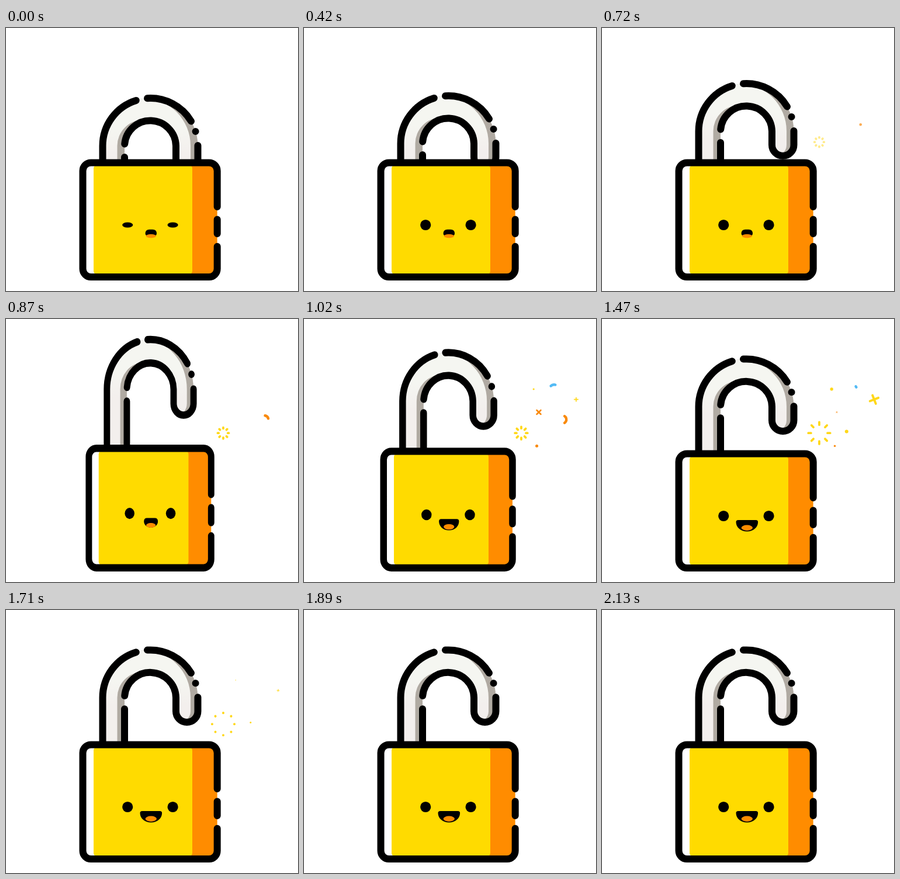
These frames come from a looping animation (500 by 450 pixels, 2160 ms). An HTML page with a canvas:

```html
<!DOCTYPE html>
<html lang="en">
<head>
<meta charset="utf-8">
<title>Opening padlock</title>
<style>
  html, body { margin: 0; width: 100%; height: 100%; overflow: hidden; background: #fff; }
  canvas { display: block; }
</style>
</head>
<body>
<canvas id="stage" width="500" height="450"></canvas>
<script>
const ctx = document.getElementById('stage').getContext('2d');
const LOOP = 2160, STEP = 30;
const YELLOW = '#ffdb00', SPARK = '#ffd81a', ORANGE = '#ff8c00', CORAL = '#f98a0d', BLUE = '#52baf5';

const linear = x => x;
const easeIn = x => x * x;
const easeOut = x => 1 - (1 - x) * (1 - x);
const easeBoth = x => x * x * (3 - 2 * x);
const mix = (a, b, x) => a + (b - a) * x;

// Keys are [time, value, easing towards this key].
function track(keys, t) {
  if (t <= keys[0][0]) return keys[0][1];
  for (let i = 1; i < keys.length; i++) {
    const [t1, v1, ease = linear] = keys[i];
    const [t0, v0] = keys[i - 1];
    if (t <= t1) return mix(v0, v1, ease((t - t0) / (t1 - t0)));
  }
  return keys[keys.length - 1][1];
}

const lift = [[0, 0], [120, -8, easeBoth], [240, 0, easeBoth], [360, -8, easeBoth], [480, 0, easeBoth],
  [600, 0], [720, -25, easeIn], [870, -67.5, easeOut], [1020, -55, easeBoth], [1080, -55.5],
  [1260, -53, easeBoth], [1400, -51.7, easeBoth]];
const stretch = [[720, 0], [870, 2.2, easeBoth], [1020, 1, easeIn], [1080, 0], [1170, -.6, easeOut],
  [1260, -.35, easeBoth], [1380, 0, easeBoth]];
const eyeOpen = [[0, .5], [120, 1, easeOut]];
const smile = [[750, 0], [1020, .9, easeBoth], [1110, 1, easeOut]];

const tube = new Path2D('M165.5 340V201.5A81.5 81.5 0 0 1 328.5 201.5V225A18.75 18.75 0 0 1 291 225V201.5A44 44 0 0 0 203 201.5V340Z');
const tubeLine = new Path2D('M165.5 340V201.5A81.5 81.5 0 0 1 222.8 123.9M242 120.3A81.5 81.5 0 0 1 317 159.5M324.6 177v.01' +
  'M328.5 201V225A18.75 18.75 0 0 1 291 225V201.5A44 44 0 0 0 203.2 198.5M203 221V340');
const boxLine = new Path2D('M361.7 306V244.5A14 14 0 0 0 347.7 230.5H145.5A14 14 0 0 0 131.5 244.5V412A14 14 0 0 0 145.5 426H347.7' +
  'A14 14 0 0 0 361.7 412V373.8M361.7 327.5V352');

function fill(color, path) {
  ctx.fillStyle = color;
  ctx.fill(path);
}

function stroke(color, width, path) {
  ctx.strokeStyle = color;
  ctx.lineWidth = width;
  ctx.stroke(path);
}

function ellipse(color, x, y, rx, ry = rx) {
  const p = new Path2D();
  p.ellipse(x, y, rx, ry, 0, 0, Math.PI * 2);
  fill(color, p);
}

function rect(color, x, y, w, h, r = 0) {
  const p = new Path2D();
  p.roundRect(x, y, w, h, r);
  fill(color, p);
}

function drawShackle(dy) {
  ctx.save();
  ctx.translate(0, dy);
  ctx.save();
  ctx.clip(tube);
  rect('#b0aaa2', 150, 110, 190, 240);
  ctx.translate(-12.5, 0);
  const light = ctx.createLinearGradient(0, 170, 0, 215);
  light.addColorStop(0, '#f5f6f1');
  light.addColorStop(1, '#f3efed');
  fill(light, tube);
  ctx.restore();
  stroke('#000', 12, tubeLine);
  ctx.restore();
}

function drawBox() {
  rect('#fff', 131.5, 230.5, 230, 195.5, 14);
  rect(ORANGE, 300, 231, 61.7, 194.5, 12);
  rect(YELLOW, 150, 235, 169, 186, 5);
  stroke('#000', 12, boxLine);
}

function drawFace(open, happy) {
  for (const x of [208.2, 285.6]) ellipse('#000', x, 337, 9.1, 9.1 * open);
  const at = (a, b) => mix(a, b, happy);
  const half = at(9.7, 18.8), top = at(344.8, 344), r = at(7, 3.5), bottom = at(357.8, 363.6);
  const knee = mix(top + r, bottom, .55), foot = half * .58;
  ctx.save();
  ctx.translate(248.3, 0);
  fill('#000', new Path2D(`M${r - half} ${top}H${half - r}Q${half} ${top} ${half} ${top + r}` +
    `C${half} ${knee} ${foot} ${bottom} 0 ${bottom}C${-foot} ${bottom} ${-half} ${knee} ${-half} ${top + r}` +
    `Q${-half} ${top} ${r - half} ${top}Z`));
  ellipse(ORANGE, 0, at(356, 357.3), at(8.6, 9.6), at(3.2, 4.7));
  ctx.restore();
}

function drawBurst(t) {
  if (t < 690 || t > 1800) return;
  const inner = track([[690, 7.5], [1020, 8], [1260, 10, easeIn], [1710, 19, easeBoth]], t);
  const outer = track([[720, 8.3], [1020, 10.8], [1260, 17.8, easeBoth], [1710, 19.1, easeOut]], t);
  const width = track([[720, 3.8], [1500, 3.8], [1710, 4], [1800, 0]], t);
  if (!width) return;
  const rays = new Path2D();
  for (let i = 0; i < 8; i++) {
    const c = Math.cos(i * Math.PI / 4), s = Math.sin(i * Math.PI / 4);
    rays.moveTo(372 + c * inner, 195.2 + s * inner);
    rays.lineTo(372 + c * outer, 195.2 + s * outer);
  }
  ctx.globalAlpha = track([[690, 0], [720, .5], [780, 1]], t);
  stroke(SPARK, width, rays);
  ctx.globalAlpha = 1;
}

// Angles in degrees; the arc runs from tail to head in either direction.
function drawCurl(color, x, y, r, tail, head) {
  if (Math.abs(head - tail) < 1) return;
  const p = new Path2D(), rad = Math.PI / 180;
  p.arc(x, y, r, tail * rad, head * rad, head < tail);
  stroke(color, 4.4, p);
}

function drawCross(color, x, y, scale, turn) {
  if (scale <= 0) return;
  ctx.save();
  ctx.translate(x, y);
  ctx.rotate(turn * Math.PI / 180);
  ctx.scale(scale, scale);
  stroke(color, 4.6, new Path2D('M-9 0H9M0-9V9'));
  ctx.restore();
}

function drawDot(color, x, y, keys, t) {
  const r = track(keys, t);
  if (r > 0) ellipse(color, x, y, r);
}

function drawSparks(t) {
  drawBurst(t);
  if (t >= 690 && t < 1410) {
    ctx.globalAlpha = track([[690, 0], [720, .7], [780, 1]], t);
    drawCurl(CORAL, 442.5, 172, 6.8,
      track([[720, -89], [1020, -58, easeIn], [1260, 188], [1410, 360, easeOut]], t),
      track([[720, -86], [1020, 58], [1260, 350], [1410, 360, easeOut]], t));
    ctx.globalAlpha = 1;
  }
  if (t >= 960) {
    drawCurl(BLUE, 428.3, 120.3, 8,
      track([[960, -70], [1020, -75], [1260, -82], [1500, -400, easeBoth]], t),
      track([[960, -72], [1020, -135], [1260, -305], [1500, -400, easeOut]], t));
  }
  drawCross(SPARK, 466, 137.7,
    track([[960, 0], [1020, .36], [1080, .62], [1170, 1, easeOut], [1380, 1], [1710, .22, easeBoth], [1800, 0]], t),
    track([[1020, 0], [1260, 43, easeBoth], [1710, 100, easeBoth]], t));
  drawCross(CORAL, 402, 159.5,
    track([[930, 0], [1020, .55], [1170, .68, easeOut], [1260, .65], [1500, 0, easeIn]], t),
    track([[1020, 45], [1260, 105], [1500, 150]], t));
  drawDot(SPARK, 393.2, 120, [[960, 0], [1020, 1.6], [1200, 3.1, easeOut], [1380, 3.1], [1710, .7, easeBoth], [1770, 0]], t);
  drawDot(SPARK, 418.8, 192.5, [[1200, 0], [1260, 1.6], [1440, 3, easeOut], [1560, 3], [1710, 1.5, easeBoth], [1800, 0]], t);
  drawDot(CORAL, 398.6, 217.3, [[930, 0], [1020, 2.5], [1140, 3.1, easeOut], [1290, 3.1], [1560, 0, easeIn]], t);
}

function draw(t) {
  ctx.clearRect(0, 0, 500, 450);
  ctx.lineCap = ctx.lineJoin = 'round';
  const s = track(stretch, t);
  ctx.save();
  ctx.translate(246.6, 432);
  ctx.scale(1 - .041 * s, 1 + .021 * s);
  ctx.translate(-246.6, -432);
  drawShackle(track(lift, t));
  drawBox();
  drawFace(track(eyeOpen, t), track(smile, t));
  ctx.restore();
  drawSparks(t);
}

const start = performance.now();
function tick() {
  const t = (performance.now() - start) % LOOP;
  draw(Math.floor(t / STEP) * STEP);
  requestAnimationFrame(tick);
}
tick();
</script>
</body>
</html>
```
